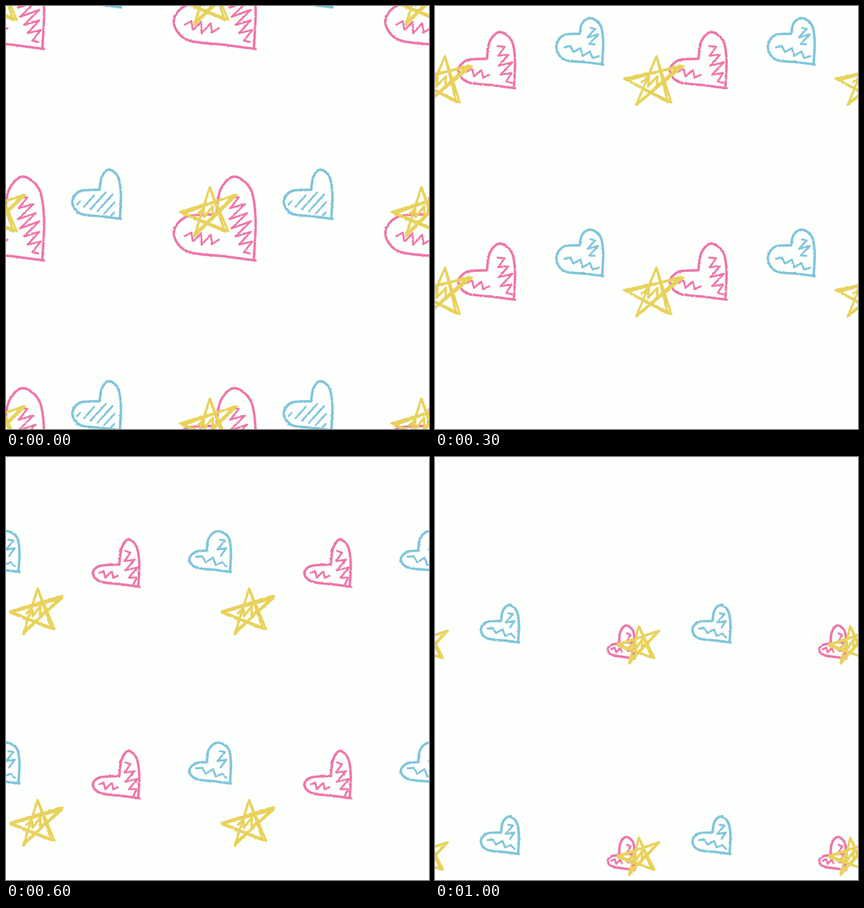
Recreate the animation shown at these times as an HTML page. Size 600 by 600 pixels, loop 1.1 s.

```html
<!DOCTYPE html>
<html lang="en">
<head>
<meta charset="utf-8">
<title>Falling hearts and stars</title>
<style>
html, body { margin: 0; width: 100%; height: 100%; overflow: hidden; background: #fdfffd; }
svg { display: block; width: 600px; height: 600px; }
path { fill: none; stroke-linecap: round; stroke-linejoin: round; }
</style>
</head>
<body>
<svg viewBox="0 0 600 600">
  <defs>
    <filter id="crayon" filterUnits="userSpaceOnUse" x="-60" y="-60" width="620" height="620" color-interpolation-filters="sRGB">
      <feTurbulence type="fractalNoise" baseFrequency=".3" numOctaves="2" seed="4"/>
      <feDisplacementMap in="SourceGraphic" scale="2.4" xChannelSelector="R" yChannelSelector="G"/>
    </filter>
    <g id="tile" filter="url(#crayon)"></g>
  </defs>
  <g id="grid"></g>
</svg>
<script>
const TILE = 300, STEP = 100, STEPS = 11;
const KEY_STEPS = [0, 1, 2, 4, 6, 8, 10];

// Heart poses: left, top, width, height, then the notch as a fraction of that box.
const blue = {
  color: '#7ec5da', hatchedStep: 0,
  lower: [[.18, .62], [.9, .84]], upper: [[.75, .2], [.8, .58]],
  poses: [
    [94, 232, 69, 70, .56, .41],
    [115, 263, 71, 65, .53, .43],
    [143, 286, 71, 71, .48, .38],
    [201, 48, 62, 61, .52, .3],
    [260, 105, 59, 58, .42, .48],
    [24, 164, 60, 60, .35, .48],
    [65, 210, 54, 53, .53, .43]
  ]
};
const pink = {
  color: '#ee75a8',
  lower: [[.14, .7], [.54, .78]], upper: [[.74, .22], [.91, .93]],
  poses: [
    [238, 242, 116, 119, .52, .45],
    [272, 276, 94, 98, .45, .56],
    [304, 307, 84, 86, .53, .53],
    [62, 67, 77, 73, .48, .42],
    [123, 117, 66, 67, .57, .53],
    [189, 166, 75, 77, .42, .57],
    [245, 239, 38, 47, .42, .55]
  ]
};
// Star poses: centre, radius, tilt in degrees.
const star = {
  color: '#e8d25c',
  tips: [[.05, -.87], [1, -.6], [.7, .68], [-.5, .87], [-1, 0]],
  poses: [
    [287, 292, 40, 0],
    [273, 340, 35, -16],
    [312, 366, 39, 10],
    [306, 147, 43, 0],
    [343, 219, 37, 0],
    [64, 268, 21, 10],
    [289, 266, 30, -3]
  ]
};

const lerp = (a, b, t) => a + (b - a) * t;
const range = (n, make) => Array.from({ length: n }, (_, i) => make(i));

function seeded(seed) {
  return () => {
    seed = (seed * 16807 + 11) % 2147483647;
    return seed / 2147483647 - .5;
  };
}

function poseAt(poses, step) {
  const next = KEY_STEPS.findIndex(key => key >= step);
  const to = poses[next];
  if (KEY_STEPS[next] === step) return to;
  // Positions repeat every tile, so travel the short way round.
  return poses[next - 1].map((v, i) => {
    const d = to[i] - v;
    return v + (i < 2 ? d - TILE * Math.round(d / TILE) : d) / 2;
  });
}

const line = pts => 'M' + pts.join('L');

// Catmull-Rom spline as cubic Béziers.
function curve(pts) {
  const at = i => pts[Math.max(0, Math.min(pts.length - 1, i))];
  const handle = (i, side) => at(i).map((v, k) => v + side * (at(i + 1)[k] - at(i - 1)[k]) / 6);
  return 'M' + pts[0] + pts.slice(1).map((p, i) => `C${handle(i, 1)} ${handle(i + 1, -1)} ${p}`).join('');
}

// A pen swinging along (dx, dy) while it moves from one point to another.
function zigzag([from, to], count, dx, dy, random) {
  return range(count, i => {
    const t = i / (count - 1);
    const swing = (i % 2 ? 1 : -1) * (.4 + Math.sin(Math.PI * t) + random() * .4);
    return [lerp(from[0], to[0], t) + dx * swing, lerp(from[1], to[1], t) + dy * swing];
  });
}

// Slanted separate strokes, longest in the middle.
const hatch = () => range(6, i => {
  const x = .1 + .14 * i, y = .71 + .045 * i, reach = .06 + .26 * Math.sin(Math.PI * i / 5);
  return [[x, y], [x + reach, y - reach * 1.1]];
});

const path = (d, color, width) => `<path d="${d}" stroke="${color}" stroke-width="${width}"/>`;

function drawHeart(heart, step) {
  const [x, y, w, h, nx, ny] = poseAt(heart.poses, step);
  const place = pts => pts.map(p => [x + p[0] * w, y + p[1] * h]);
  const random = seeded(step * 97 + 5);
  const left = [[1, 1], [.62, .95], [.16, .89], [0, (ny + .9) / 2], [.15, ny + .03], [nx, ny]];
  const right = [[nx, ny], [nx + .05, ny * .35], [nx * .55 + .45, 0], [.94, .15], [1, .5], [.98, .98]];
  const scribble = step === heart.hatchedStep ? hatch() : [
    zigzag(heart.lower, Math.round(3 + h * (heart.lower[1][0] - heart.lower[0][0]) / 10), .02, -.05, random),
    zigzag(heart.upper, Math.round(2 + h * (heart.upper[1][1] - heart.upper[0][1]) / 7), .08, -.05, random)
  ];
  return path(scribble.map(place).map(line).join(''), heart.color, 2.7) +
    path([left, right].map(place).map(curve).join(''), heart.color, 3.5);
}

function drawStar(step) {
  const [x, y, r, tilt] = poseAt(star.poses, step);
  const sin = Math.sin(tilt * Math.PI / 180), cos = Math.cos(tilt * Math.PI / 180);
  const place = pts => pts.map(([u, v]) => [x + r * (u * cos - v * sin), y + r * (u * sin + v * cos)]);
  const random = seeded(step * 53 + 7);
  // Go round the pentagram almost twice, a little off the second time.
  const rounds = range(10, i => star.tips[i * 2 % 5].map(v => i > 5 ? v * .93 + random() * .14 : v));
  const knot = zigzag([[-.35, 0], [.35, 0]], 6, .06, -.14, random);
  return path(line(place(rounds)) + line(place(knot)), star.color, 3.3);
}

const tile = document.getElementById('tile');
const offsets = [-TILE, 0, TILE];
document.getElementById('grid').innerHTML = offsets.map(x => offsets.map(y =>
  `<use href="#tile" x="${x}" y="${y}"/>`).join('')).join('');

let shown = -1;
function tick() {
  const step = Math.floor(performance.now() / STEP) % STEPS;
  if (step !== shown) {
    shown = step;
    tile.innerHTML = drawHeart(blue, step) + drawHeart(pink, step) + drawStar(step);
  }
  requestAnimationFrame(tick);
}
tick();
</script>
</body>
</html>
```
